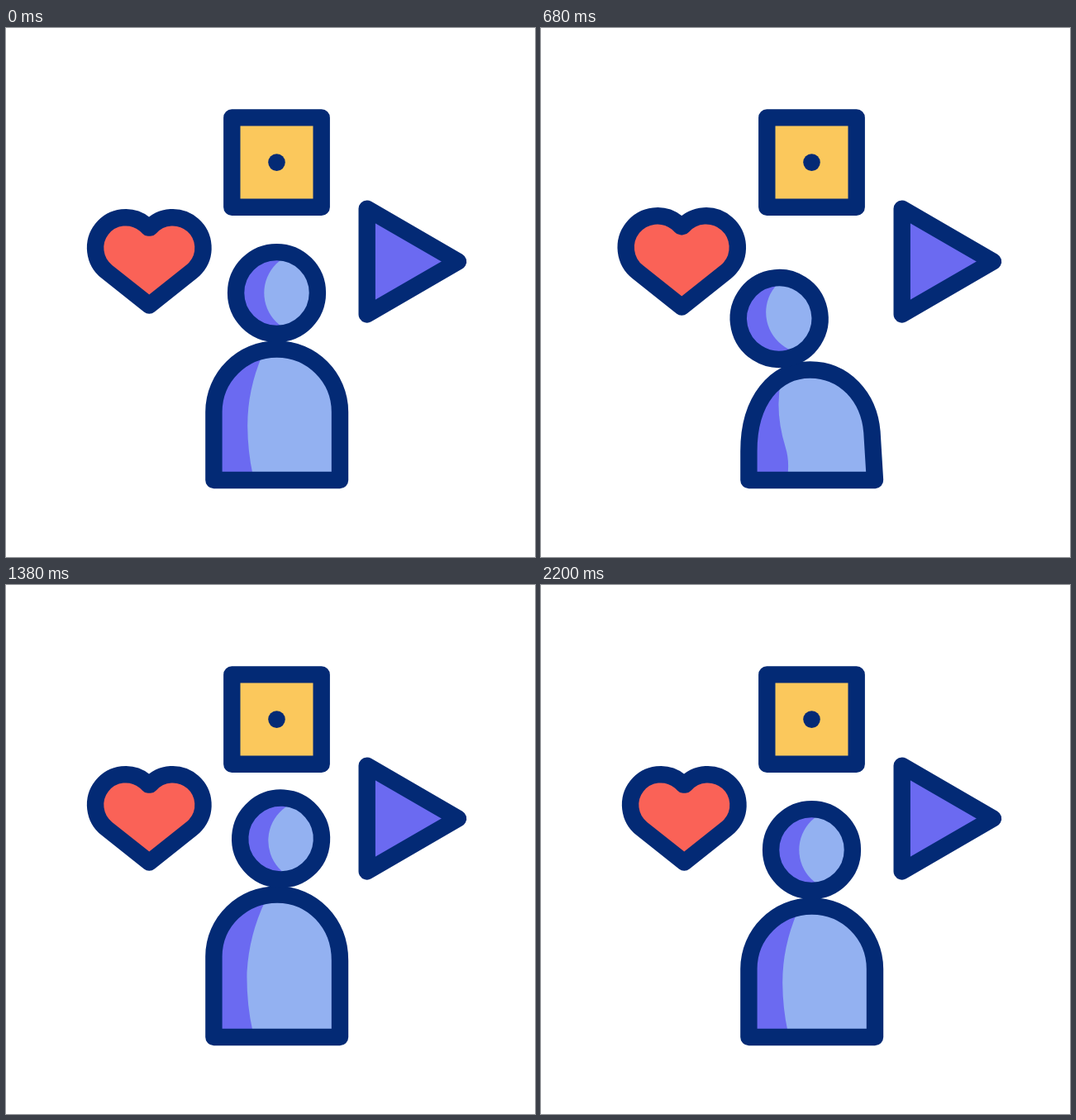
An HTML page with a canvas that plays this animation: 640 by 640 pixels, repeating every 2.4 s.

```html
<!DOCTYPE html>
<html lang="en">
<head>
<meta charset="utf-8">
<title>Person and reactions</title>
<style>
  html, body { margin: 0; width: 100%; height: 100%; overflow: hidden; background: #fff; }
  canvas { display: block; }
</style>
</head>
<body>
<canvas id="stage" width="640" height="640"></canvas>
<script>
const ctx = document.getElementById('stage').getContext('2d');
const LOOP = 2400;
const NAVY = '#032a75', RED = '#fa6257', YELLOW = '#fbc85c', PURPLE = '#6b6af1', LIGHT = '#93b1f1';

// Eased 0 to 1 between two times
function ramp(t, from, to) {
  const p = Math.min(1, Math.max(0, (t - from) / (to - from)));
  return p * p * (3 - 2 * p);
}

function fill(path, color) {
  ctx.fillStyle = color;
  ctx.fill(path);
}

function circle(x, y, r) {
  const p = new Path2D();
  p.arc(x, y, r, 0, Math.PI * 2);
  return p;
}

// Base colour, optional lighter part clipped to the shape, then the outline
function shape(path, color, lit) {
  fill(path, color);
  if (lit) {
    ctx.save();
    ctx.clip(path);
    fill(lit, LIGHT);
    ctx.restore();
  }
  ctx.stroke(path);
}

// The weights say how far the person leans left, stretches up and leans right
function drawPerson(left, up, right) {
  const side = left + right, lean = right - left;
  const drop = 31 * left + 35 * right - 26 * up;
  drawBody(left, up, right, drop);

  ctx.save();
  ctx.translate(327.5 + 28.3 * right - 44 * left, 320.5 + 37.8 * side - 26 * up);
  ctx.rotate((21 * right - 14 * left) * Math.PI / 180);
  shape(circle(0, 0, 49.4), PURPLE, circle(34.4, 0, 49.6));
  ctx.restore();
}

function drawBody(left, up, right, drop) {
  const side = left + right, lean = right - left;
  const x1 = 251.4, x2 = 404, base = 547, bend = 42;
  const topX = 327.7 + 2.5 * lean, topY = 388.5 + drop;

  // The shoulder on the leaning side sinks further and curves longer
  const shoulder = (near, far) => 464.5 + 56 * near + 30 * far - 26 * up;
  const y1 = shoulder(left, right), y2 = shoulder(right, left), tuck = 4 * left;

  const body = new Path2D();
  body.moveTo(x1, base);
  body.lineTo(x1, y1);
  body.bezierCurveTo(x1, y1 - bend - 22 * left, topX - bend, topY, topX, topY);
  body.bezierCurveTo(topX + bend, topY, x2 - 2 * tuck, y2 - bend - 20 * right, x2 - tuck, y2);
  body.lineTo(x2, base);
  body.closePath();

  // The edge of the shade swings with the lean, less so further down
  const edgeX = 310 + 21.5 * lean, edgeY = 396 + 34 * side - 26 * up;
  const lit = new Path2D();
  lit.moveTo(edgeX, edgeY - 60);
  lit.lineTo(edgeX, edgeY);
  lit.quadraticCurveTo(292 + 11 * lean, 438 + 32 * side - 26 * up,
    292.2 - 4 * lean, 482 + 31 * side - 24 * up);
  lit.quadraticCurveTo(292.5 - 9 * lean, 512 + 13 * side - 10 * up, 298.5, 540);
  lit.lineTo(298.5, 560);
  lit.lineTo(450, 560);
  lit.lineTo(450, edgeY - 60);
  shape(body, PURPLE, lit);
}

function drawHeart(grow) {
  const k = 1 + 0.385 * grow, x = 173.3 - 32 * grow, y = 282.4;
  const lobe = 28.4 * k, lobeY = y - 16.4 * k, r = 36.8 * k;
  const notch = -0.23 * Math.PI, edge = 0.713 * Math.PI;
  const p = new Path2D();
  p.moveTo(x, y + 53.2 * k);
  p.arc(x - lobe, lobeY, r, edge, notch);
  p.lineTo(x, y - 41.4 * k);
  p.arc(x + lobe, lobeY, r, Math.PI - notch, Math.PI - edge);
  p.closePath();
  shape(p, RED);
}

function drawSquare(grow) {
  const half = 54.2 + 27.1 * grow, x = 327.5, y = 162.6 - 39.2 * grow;
  const p = new Path2D();
  p.rect(x - half, y - half, half * 2, half * 2);
  shape(p, YELLOW);
  fill(circle(x, y, 10.3), NAVY);
}

function drawTriangle(grow) {
  const x = 436.7 + 6 * grow, half = 63.9 + 22.8 * grow;
  const p = new Path2D();
  p.moveTo(x, 282.5 - half);
  p.lineTo(547 + 45.3 * grow, 282.5);
  p.lineTo(x, 282.5 + half);
  p.closePath();
  shape(p, PURPLE);
}

function draw(t) {
  ctx.fillStyle = '#fff';
  ctx.fillRect(0, 0, 640, 640);
  ctx.strokeStyle = NAVY;
  ctx.lineWidth = 20.4;
  ctx.lineJoin = 'round';

  const rise = ramp(t, 600, 1000);
  drawPerson(
    ramp(t, 200, 466) - rise,
    rise - ramp(t, 1280, 1615),
    ramp(t, 1285, 1640) - ramp(t, 1790, 2190));

  drawHeart(ramp(t, 200, 400) - ramp(t, 600, 700));
  drawSquare(ramp(t, 800, 1000) - ramp(t, 1158, 1258));
  drawTriangle(ramp(t, 1400, 1600) - ramp(t, 1790, 1900));
}

const start = performance.now();
function tick() {
  draw((performance.now() - start) % LOOP);
  requestAnimationFrame(tick);
}
tick();
</script>
</body>
</html>
```
